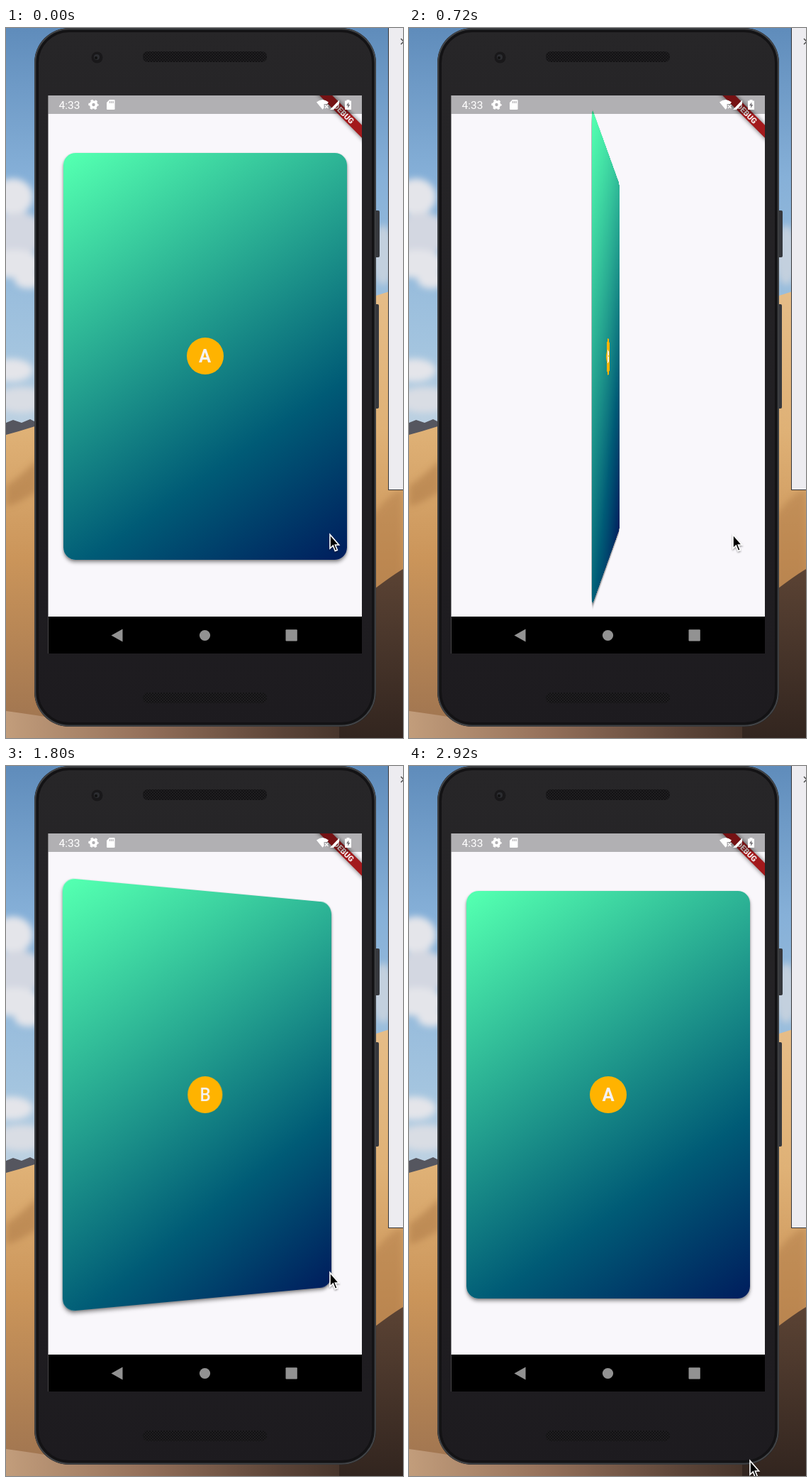
These frames come from a looping animation (560x1000 px, 3000 ms). An HTML page:

```html
<!DOCTYPE html>
<html lang="en">
<head>
<meta charset="utf-8">
<title>Card flip</title>
<style>
  html, body { margin: 0; width: 100%; height: 100%; overflow: hidden; background: #000; }
  #stage { position: absolute; left: 0; top: 0; width: 560px; height: 1000px; overflow: hidden;
    font-family: Roboto, "Open Sans", sans-serif; }
  #stage > svg { position: absolute; left: 0; top: 0; }
  #space { position: absolute; left: 80.5px; top: 175.5px; width: 400px; height: 573.5px; perspective: 1075px; }
  #card { position: absolute; inset: 0; border-radius: 17px;
    background: linear-gradient(145.1deg, #53ffb0 0%, #53ffb0 1.5%, #005b76 70%, #001d5d 100%);
    box-shadow: 0 4px 5px rgba(0,0,0,.34), 0 1px 3px rgba(0,0,0,.26); }
  #ink { position: absolute; inset: 0; border-radius: 17px; overflow: hidden; }
  #splash { position: absolute; left: 376px; top: 536px; width: 0; height: 0; border-radius: 50%;
    background: #c8c8c8; transform: translate(-50%, -50%); }
  #disc { position: absolute; left: 50%; top: 50%; width: 52px; height: 52px; margin: -26px;
    border-radius: 50%; background: #ffb300; color: #f4f2f7; font-size: 25.5px; line-height: 52px;
    text-align: center; }
</style>
</head>
<body>
<div id="stage">
  <svg width="560" height="1000" viewBox="0 0 560 1000">
    <defs>
      <linearGradient id="sky" x2="0" y2="1">
        <stop offset="0" stop-color="#5f8cbb"/><stop offset=".35" stop-color="#86b0d8"/>
        <stop offset=".75" stop-color="#a3c4df"/><stop offset="1" stop-color="#c6d6e3"/>
      </linearGradient>
      <linearGradient id="dune" x2="0" y2="1">
        <stop offset="0" stop-color="#e6bd88"/><stop offset=".32" stop-color="#dfb176"/>
        <stop offset=".6" stop-color="#cb955a"/><stop offset=".85" stop-color="#ae7f53"/>
        <stop offset="1" stop-color="#9d7350"/>
      </linearGradient>
      <linearGradient id="floor">
        <stop offset="0" stop-color="#c29d7b"/><stop offset=".35" stop-color="#94705a"/>
        <stop offset=".7" stop-color="#5a4337"/><stop offset="1" stop-color="#33261f"/>
      </linearGradient>
      <linearGradient id="shade" x2="0" y2="1">
        <stop offset="0" stop-color="#5b4334"/><stop offset="1" stop-color="#32251f"/>
      </linearGradient>
      <linearGradient id="body" x2="0" y2="1">
        <stop offset="0" stop-color="#272628"/><stop offset="1" stop-color="#1d1b1f"/>
      </linearGradient>
      <pattern id="mesh" width="4" height="4" patternUnits="userSpaceOnUse">
        <circle cx="1" cy="1" r=".8" fill="#2d2c2e"/><circle cx="3" cy="3" r=".8" fill="#2d2c2e"/>
      </pattern>
      <filter id="soft" x="-50%" y="-50%" width="200%" height="200%"><feGaussianBlur stdDeviation="5"/></filter>
    </defs>

    <rect width="560" height="600" fill="url(#sky)"/>
    <g filter="url(#soft)" fill="#e4e5ea">
      <ellipse cx="10" cy="238" rx="28" ry="26"/>
      <ellipse cx="18" cy="290" rx="38" ry="30" fill="#d3d7e1"/>
      <ellipse cx="12" cy="332" rx="38" ry="20"/>
      <ellipse cx="32" cy="355" rx="20" ry="12"/>
      <ellipse cx="8" cy="482" rx="30" ry="16"/>
      <ellipse cx="22" cy="524" rx="38" ry="18" fill="#d9dde4"/>
      <ellipse cx="532" cy="320" rx="16" ry="42" fill="#c3d0de"/>
    </g>
    <path d="M0 556 L10 552 L22 556 L34 551 L44 556 V580 H0Z" fill="#55565f"/>
    <path d="M0 573 L18 568 L44 560 L300 480 L522 377 L560 365 V1000 H0Z" fill="url(#dune)"/>
    <path d="M0 645 Q20 632 44 608 V652 Q22 668 0 674Z" fill="#a87543" opacity=".5" filter="url(#soft)"/>
    <path d="M515 690 Q540 655 560 650 V800 H515Z" fill="#b07c4a" opacity=".5" filter="url(#soft)"/>
    <path d="M0 962 Q50 968 130 984 H560 V1000 H0Z" fill="url(#floor)"/>
    <path d="M470 830 Q530 780 560 762 V1000 H470Z" fill="url(#shade)"/>

    <rect x="539.5" y="-3" width="30" height="653.5" fill="#edecf0" stroke="#343438"/>
    <path d="M557 15 l8 8 m0 -8 l-8 8" stroke="#444" stroke-width="1.4"/>

    <rect x="519" y="257" width="8" height="66" rx="2" fill="#36383d"/>
    <rect x="519" y="389" width="7" height="147" rx="2" fill="#36383d"/>
    <rect x="40" y="0" width="482" height="984" rx="49" fill="#151517"/>
    <rect x="41.2" y="1.2" width="479.600" height="981.600" rx="47.800" fill="none" stroke="#424447" stroke-width="2"/>
    <rect x="45" y="5" width="472" height="974" rx="44" fill="url(#body)" stroke="#131214" stroke-width="2"/>
    <circle cx="128.500" cy="41.500" r="8" fill="#19181a"/>
    <circle cx="128" cy="41" r="4" fill="#2c2d31"/><circle cx="127" cy="42" r="2" fill="#111"/>
    <g id="grilles"></g>
    <rect x="59.500" y="95" width="442.500" height="786" fill="#f9f7fb"/>
  </svg>

  <div id="space"><div id="card"><div id="ink"><div id="splash"></div></div><div id="disc"></div></div></div>

  <svg width="560" height="1000" viewBox="0 0 560 1000">
    <defs>
      <clipPath id="screen"><rect x="59.500" y="95" width="442.500" height="786"/></clipPath>
      <filter id="drop" x="-40%" y="-40%" width="180%" height="180%">
        <feDropShadow dx="0" dy="1.5" stdDeviation="1.3" flood-opacity=".4"/>
      </filter>
      <filter id="glow" x="-20%" y="-80%" width="140%" height="260%"><feGaussianBlur stdDeviation="3"/></filter>
    </defs>
    <g clip-path="url(#screen)">
      <g transform="translate(502 95) rotate(45)">
        <rect x="-65" y="29.500" width="130" height="12.800" filter="url(#glow)" opacity=".6"/>
        <rect x="-65" y="29.500" width="130" height="12.800" fill="#a3191c"/>
        <text y="39.900" text-anchor="middle" font-size="11" font-weight="900" fill="#f5eded">DEBUG</text>
      </g>
      <rect x="59" y="95" width="443" height="26" opacity=".285"/>
    </g>

    <g fill="#fff">
      <text x="74.500" y="113.700" font-size="15.500">4:33</text>
      <circle cx="123.500" cy="108" r="4" fill="none" stroke="#fff" stroke-width="3.600"/>
      <circle cx="123.500" cy="108" r="6.200" fill="none" stroke="#fff" stroke-width="2"
        stroke-dasharray="3.246" stroke-dashoffset="1.6"/>
      <path d="M146 101 H152.500 Q153.500 101 153.500 102 V114 Q153.500 115 152.500 115 H143 Q142 115 142 114 V105Z"/>
      <path d="M146.500 103 v3 m2.300 -3 v3 m2.300 -3 v3" stroke="#b2b0b3" stroke-width="1.2"/>
      <path d="M438 104.500 Q446.500 97.500 455 104.500 L453 107 H448.500 V112.500 L446.500 114.800Z"/>
      <path d="M450 108.500 l4.500 4.500 m0 -4.500 l-4.500 4.500" stroke="#fff" stroke-width="1.4"/>
      <path d="M457 115 L470 101.500 V107 L462 115Z"/>
      <path d="M480.500 101 H484.500 V102.400 H487 V115 H478 V102.400 H480.500Z"/>
      <path d="M483.300 104.500 L480 109.300 H482.200 V113 L485.300 108 H483.300Z" fill="#777579"/>
    </g>

    <rect x="59.500" y="829" width="442.500" height="52"/>
    <g fill="#929292">
      <path d="M148.500 855.500 L164.500 846.500 V864.500Z"/>
      <circle cx="280.500" cy="855.500" r="7.600"/>
      <rect x="394.500" y="847.200" width="16.300" height="16.300" rx="1"/>
    </g>

    <path id="cursor" d="M0 0 V19.500 L4.300 15.500 L7.300 23 L10.300 21.800 L7.300 14.500 H12.600Z"
      fill="#000" stroke="#fff" stroke-width="1.6" filter="url(#drop)"/>
  </svg>
</div>

<script>
const $ = id => document.getElementById(id);
const LOOP = 3000, FPS = 15;
const flips = [{ start: 261, span: 911 }, { start: 1610, span: 954 }];
const clamp = v => Math.min(1, Math.max(0, v));

$('grilles').innerHTML = [33, 936].map(y => ['#131214', 'url(#mesh)'].map(f =>
  `<rect x="193" y="${y}" width="175" height="15" rx="7" fill="${f}"/>`).join('')).join('');

// Cubic Bezier with y handles 0 and 1; solved for x by bisection.
function ease(x, x1, x2) {
  let lo = 0, hi = 1;
  for (let i = 0; i < 24; i++) {
    const s = (lo + hi) / 2, r = 1 - s;
    if (3 * r * r * s * x1 + 3 * r * s * s * x2 + s * s * s < x) lo = s; else hi = s;
  }
  return lo * lo * (3 - 2 * lo);
}
const easeIn = x => ease(x, .42, 1);
const easeOut = x => ease(x, 0, .58);

// Progress 0 is side A, 1 is side B; the sides swap when edge-on.
function turn(p) {
  const front = p < .5;
  const deg = front ? -90 * easeIn(p * 2) : 90 * (1 - easeOut(p * 2 - 1));
  $('card').style.transform = `rotateY(${deg}deg)`;
  $('disc').textContent = front ? 'A' : 'B';
  $('disc').style.fontWeight = front ? 700 : 500;
}

function ripple(t) {
  const { start } = flips.find(f => t < f.start + f.span) || flips[1];
  const age = t - start + 40;
  const on = age > 0 && age < 200;
  const s = $('splash').style;
  s.width = s.height = (on ? age * 2.08 : 0) + 'px';
  s.opacity = on ? .16 * clamp((200 - age) / 170) : 0;
}

function pose(t) {
  const [a, b] = flips.map(f => clamp((t - f.start) / f.span));
  turn(a - b);
  ripple(t);
  const m = easeOut(clamp((t - 2580) / 240));
  $('cursor').setAttribute('transform', `translate(${457 + 24 * m} ${713.5 + 265 * m})`);
}

const t0 = performance.now();
function tick() {
  const t = (performance.now() - t0) % LOOP;
  // 15 poses a second, each held on a 40 ms grid
  const step = Math.floor((3 * Math.floor((t + 1) / 40) + 1) / 5);
  pose(step % (LOOP / 1000 * FPS) * 1000 / FPS);
  requestAnimationFrame(tick);
}
tick();
</script>
</body>
</html>
```
